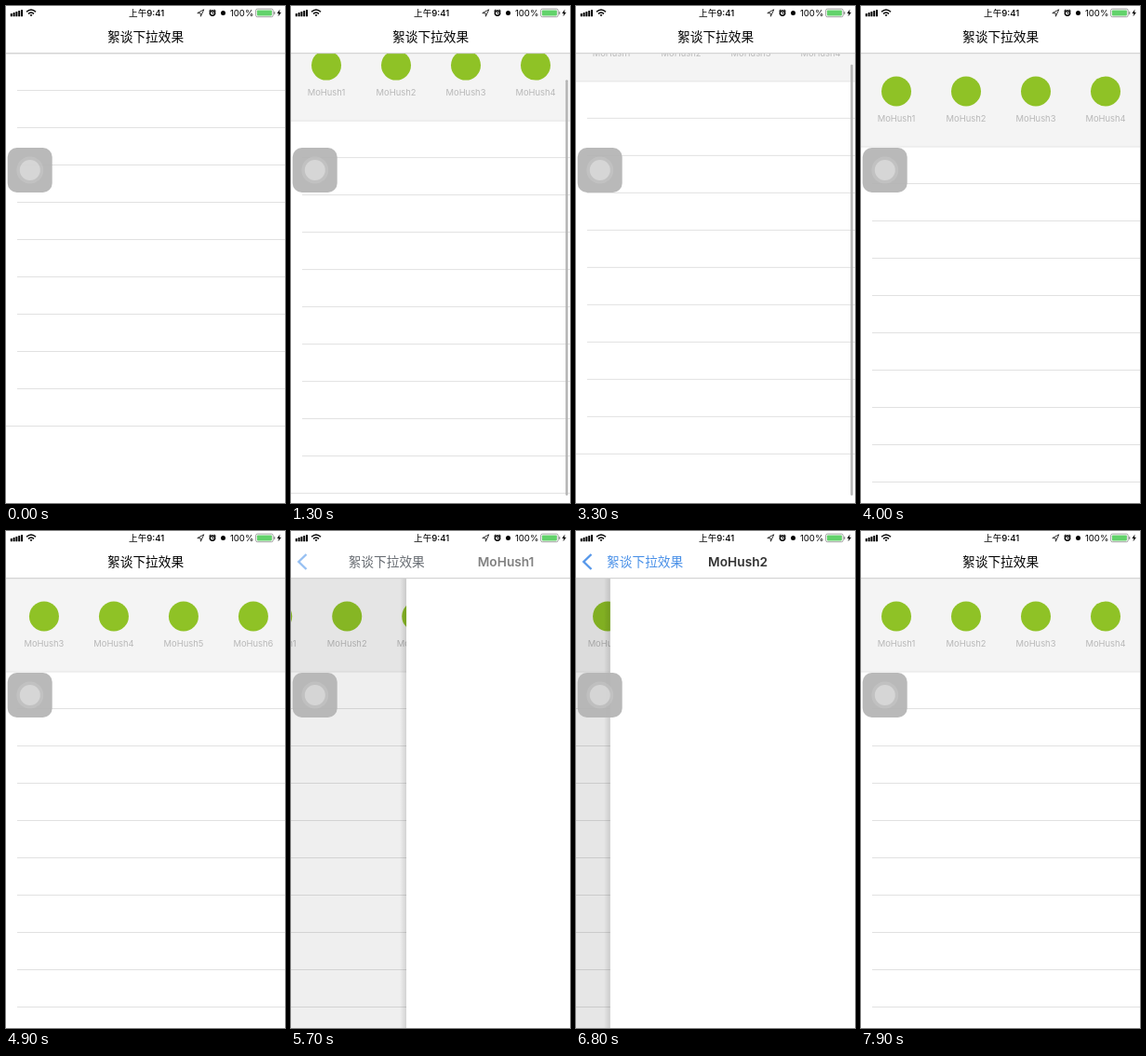
Animation, 300 px wide and 533 px high, one loop 8000 ms. Source, as an HTML page:

```html
<!DOCTYPE html>
<html lang="zh">
<head>
<meta charset="utf-8">
<title>下拉效果</title>
<style>
  html, body { margin: 0; width: 100%; height: 100%; overflow: hidden; background: #fff; }
  svg { display: block; width: 100%; height: 100%; }
  text { font-family: Inter, 'Noto Sans CJK SC', 'Noto Sans CJK', sans-serif; }
  .status { font-size: 9.6px; font-weight: 500; text-anchor: middle; }
  .title { font-size: 13.7px; font-weight: 500; }
  .page { font-size: 13.7px; font-weight: 600; text-anchor: middle; }
  .label { font-size: 9.4px; fill: #b8b8b8; text-anchor: middle; }
</style>
</head>
<body>
<svg viewBox="0 0 300 533">
  <defs>
    <linearGradient id="shade">
      <stop offset="0" stop-color="#000" stop-opacity="0"/>
      <stop offset="1" stop-color="#000" stop-opacity=".12"/>
    </linearGradient>
    <clipPath id="body"><rect y="51" width="300" height="482"/></clipPath>
  </defs>

  <g clip-path="url(#body)">
    <rect width="300" height="533" fill="#fff"/>
    <g id="home">
      <g id="list">
        <rect y="-49" width="300" height="100" fill="#f4f4f4"/>
        <path d="M0 51H300" stroke="#e4e4e4"/>
        <g id="cells"></g>
        <g id="rows" stroke="#e1e1e1"></g>
      </g>
    </g>
    <rect id="bar" x="295.3" width="2.4" rx="1.2" fill="#b2b2b2"/>
    <rect id="dim" y="51" width="300" height="482"/>
    <g id="next">
      <rect x="-7" y="51" width="7" height="482" fill="url(#shade)"/>
      <rect y="51" width="300" height="482" fill="#fff"/>
    </g>
  </g>

  <rect width="300" height="50.5" fill="#fff"/>
  <path d="M0 50.7H300" stroke="#cbcbcb"/>
  <text id="dark" class="title" y="38">絮谈下拉效果</text>
  <text id="blue" class="title" y="38" fill="#3a87e6" style="font-weight:400">絮谈下拉效果</text>
  <path id="back" d="M16.5 25L8.3 33L16.5 41" fill="none" stroke="#3a87e6" stroke-width="2.4"/>
  <text id="page" class="page" y="38" fill="#111"></text>

  <g id="signal"></g>
  <path d="M22 6.3Q27 1.7 32 6.3M24 8.4Q27 5.6 30 8.4" fill="none" stroke="#000" stroke-width="1.5"/>
  <path d="M25.5 9.6Q27 8.2 28.5 9.6L27 11.2Z"/>
  <text class="status" x="151.2" y="11">上午9:41</text>
  <path d="M205.8 7.6L212.8 3.8L209.4 11.2L209.2 7.8Z" fill="none" stroke="#222" stroke-width=".9"/>
  <circle cx="222" cy="7.6" r="2.7" fill="none" stroke="#000" stroke-width="1.5"/>
  <path d="M218.4 5.4L220.2 3.7M225.6 5.4L223.8 3.7M222 6.2V7.8H223.4" fill="none" stroke="#000"/>
  <circle cx="233.5" cy="7.4" r="2.5"/>
  <text class="status" x="253.6" y="11" style="font-weight:400">100%</text>
  <rect x="268.6" y="3.1" width="18.6" height="8.6" rx="1.8" fill="#fff" stroke="#8b8b8b" stroke-width=".8"/>
  <rect x="269.9" y="4.4" width="16" height="6" rx=".8" fill="#62d26b"/>
  <path d="M288.7 6V9" stroke="#8b8b8b" stroke-width="1.2"/>
  <path d="M294.6 3.6L291.4 8H293.4L292.6 11.2L296 6.8H293.9Z"/>

  <rect x="1.7" y="152" width="48" height="48" rx="10" fill="#b4b4b4" opacity=".93"/>
  <g fill="#fff">
    <circle cx="25.8" cy="176" r="14.5" opacity=".12"/>
    <circle cx="25.8" cy="176" r="11" opacity=".34"/>
  </g>
</svg>
<script>
const LOOP = 8000, STEP = 100, PANEL = 100, NAME = 'MoHush';
const $ = id => document.getElementById(id);
const set = (id, attrs) => {
  for (const k in attrs) $(id).setAttribute(k, attrs[k]);
};
const clamp = v => Math.min(1, Math.max(0, v));
const ramp = (t, a, b) => clamp((t - a) / (b - a));
const smooth = (t, a, b) => {
  const u = ramp(t, a, b);
  return u * u * (3 - 2 * u);
};
// critically damped spring from 0 to 1
const spring = ms => {
  const x = Math.max(0, ms) * 0.0145;
  return 1 - Math.exp(-x) * (1 + x);
};
const repeat = (n, fn) => Array.from({ length: n }, (_, i) => fn(i)).join('');

// vertical drags: start, end, direction
const DRAGS = [[850, 1540, 1], [2050, 2690, -1], [3050, 3740, 1]];

$('cells').innerHTML = repeat(6, i => {
  const x = 38 + 75 * i;
  return `<circle cx="${x}" cy="-8.5" r="16" fill="#8fc226"/>
    <text class="label" x="${x}" y="23.8">${NAME}${i + 1}</text>`;
});
$('rows').innerHTML = repeat(10, i =>
  `<path d="M${i < 9 ? 12 : 0} ${90.5 + 40 * i}H300"/>`);
$('signal').innerHTML = repeat(5, i =>
  `<rect x="${4.8 + 2.8 * i}" y="${8 - i}" width="2" height="${3.2 + i}" rx=".5"/>`);

function draw(t) {
  const pull = PANEL * DRAGS.reduce((sum, [a, b, dir]) => sum + dir * smooth(t, a, b), 0);
  const slide = 150 * (smooth(t, 4150, 4750) - smooth(t, 4850, 5450));
  let cover = spring(t - 5564) - spring(t - 6080) + spring(t - 6550) - spring(t - 7220);
  if (cover < 0.006) cover = 0;
  const p = 1 - cover;

  set('list', { transform: `translate(0 ${pull})` });
  set('cells', { transform: `translate(${-slide} 0)` });
  set('home', { transform: `translate(${-90 * cover} 0)` });
  set('next', { transform: `translate(${300 * p} 0)`, visibility: cover ? 'visible' : 'hidden' });
  set('dim', { opacity: 0.11 * cover });

  const top = 51 + 0.39 * pull;
  const opacity = Math.max(...DRAGS.map(([a, b]) => t > a ? 1 - ramp(t, b, b + 180) : 0));
  set('bar', { y: top, height: 525 - top, opacity });

  const x = 20 + 109 * p - 20 * p * p;
  const fade = Math.pow(cover, 1.2);
  set('dark', { x, opacity: clamp(2 * p - 0.25) });
  set('blue', { x, opacity: clamp(1.3 - 3 * p) });
  set('back', { opacity: fade });
  set('page', { x: 150 + 196 * p, opacity: fade });
  $('page').textContent = NAME + (t < 6550 ? 1 : 2);
}

const start = performance.now();
function tick() {
  const t = (performance.now() - start) % LOOP;
  draw(Math.floor(t / STEP) * STEP);
  requestAnimationFrame(tick);
}
tick();
</script>
</body>
</html>
```
